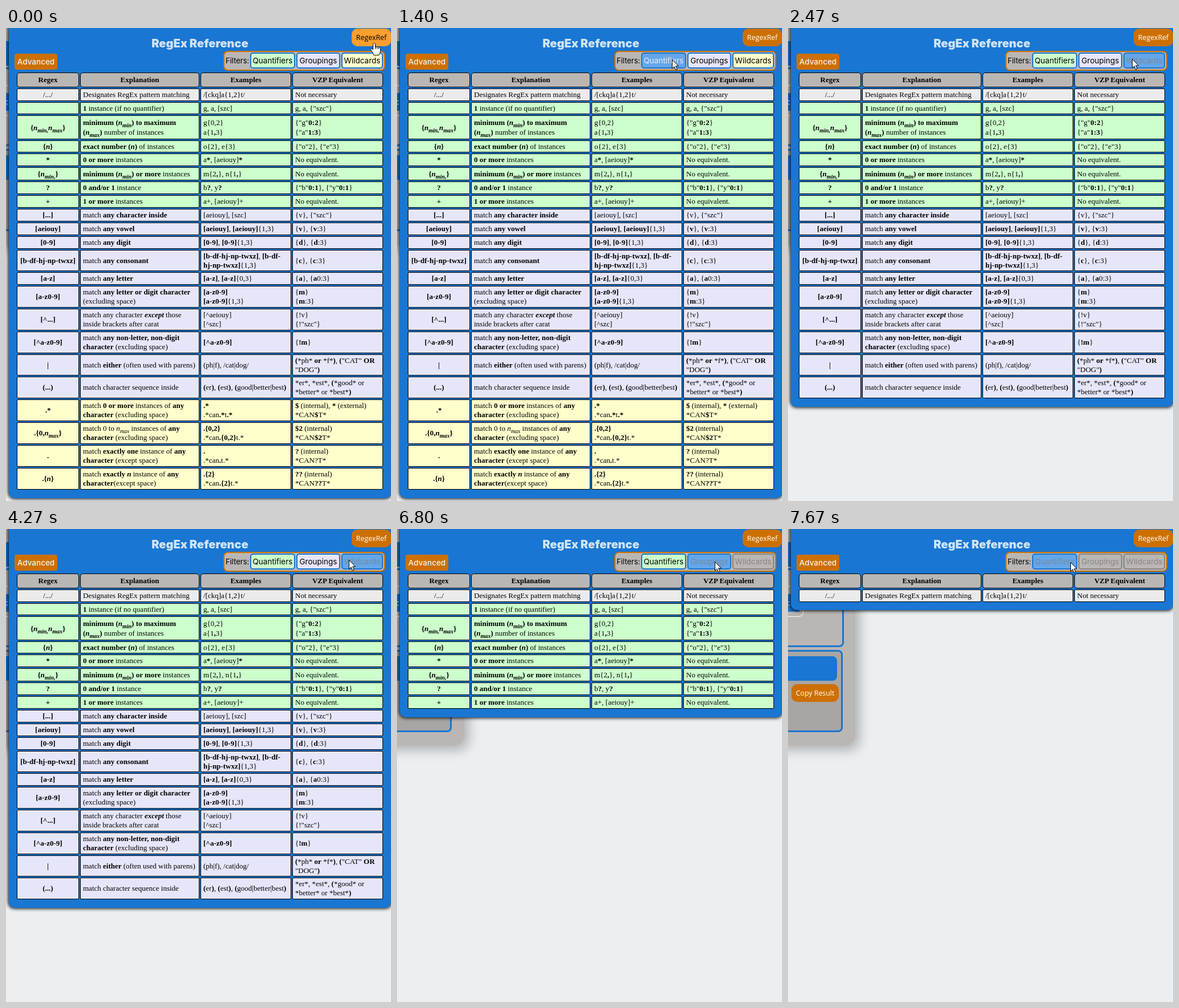
Recreate the animation shown at these times as an HTML page. Size 675 by 829 pixels, loop 8000 ms.

```html
<!DOCTYPE html>
<html lang="en">
<head>
<meta charset="utf-8">
<title>RegEx Reference</title>
<style>
:root { --blue: #1976d2; --orange: #cd7000; --grey: #bab6b4; }
html, body { margin: 0; width: 100%; height: 100%; overflow: hidden; background: #ebeff2; }
#stage { position: relative; width: 675px; height: 829px; overflow: hidden; background: #ebeff2; }
#stage div, #stage svg { position: absolute; box-sizing: border-box; }
.ui { font: 13.5px Inter, "Open Sans", sans-serif; }
.btn { display: flex; align-items: center; justify-content: center; white-space: nowrap; }
.sys { font: 12.4px "Open Sans", "Noto Sans", sans-serif; background: var(--orange); color: #fff; border-radius: 10px; }
#page { left: -60px; top: 0; width: 178px; height: 380px; background: var(--grey);
  border-radius: 0 0 20px 0; box-shadow: 8px 8px 20px rgba(0,0,0,.25); }
#panel { left: 5px; top: -20px; width: 670px; background: var(--blue); border-radius: 10px;
  box-shadow: 0 0 6px 1px #000; }
#title { left: 5px; width: 670px; top: 12px; height: 30px; line-height: 30px; text-align: center;
  font: 900 20px/30px Inter, "Open Sans", sans-serif; color: #cfe4f8; }
.cell { border: 1px solid #000; border-radius: 2px; padding: 0 4px; display: flex; align-items: center;
  font: 13px/16px "Liberation Serif", "Times New Roman", serif; color: #000; white-space: nowrap; }
.mid { justify-content: center; text-align: center; }
.head { background: var(--grey); border-radius: 5px; font-weight: bold; }
.intro { background: #ebebeb; }
.q { background: #cfc; }
.g { background: #e6e6fa; }
.w { background: #ffc; }
sub { font-size: 10px; line-height: 0; }
.filter { top: 43px; height: 28px; border: 2px solid var(--blue); border-radius: 5px; color: #000; }
.filter.hover { background: #64a6ea; color: #e4effb; }
.filter.off { background: var(--grey); border-color: #898583; color: #898583; }
.filter.off.hover { background: #64a6ea; border-color: var(--blue); color: #7b8896; }
#ref.hover { background: #ff9f2f; color: #000; }
</style>
</head>
<body>
<div id="stage">
  <div id="page">
    <div style="left:0;top:23px;width:70px;height:43px;background:var(--blue)"></div>
    <div style="left:0;top:69px;width:158px;height:138px;border:3px solid var(--blue);border-radius:8px"></div>
    <div style="left:0;top:100px;width:87px;height:54px;border:1px solid #fff;border-radius:8px"></div>
    <div class="sys" style="left:0;top:114px;width:80px;height:31px;background:var(--blue);border-radius:0;line-height:31px;padding-left:58px">c</div>
    <div style="left:0;top:212px;width:156px;height:144px;border:3px solid var(--blue);border-radius:8px;background:#a9a5a3"></div>
    <div style="left:0;top:223px;width:146px;height:43px;border-radius:8px;background:var(--blue)"></div>
    <div class="btn sys" style="left:66px;top:272px;width:83px;height:31px">Copy Result</div>
  </div>
  <div id="panel"></div>
  <div id="title">RegEx Reference</div>
  <div class="ui btn" style="left:15px;top:45px;width:75px;height:28px;border-radius:4px;background:var(--orange);color:#f3f5f8;font-weight:500">Advanced</div>
  <div class="ui" style="left:381px;top:40px;width:284px;height:35px;border:2px solid var(--orange);border-radius:8px;background:var(--grey);line-height:31px;padding-left:2px;font-size:13px">Filters:</div>
  <div id="table"></div>
  <div id="ref" class="btn sys" style="left:606px;top:1px;width:69px;height:31px">RegexRef</div>
  <svg id="arrow" width="16" height="22" viewBox="-1 -1 16 22" fill="#fff" stroke="#000">
    <path d="M.5.5V16l3.6-3.3 2.5 6 2.6-1.1-2.5-5.8h4.8z"/>
  </svg>
  <svg id="hand" width="20" height="24" viewBox="-1 -1 20 24" fill="#fff" stroke="#000">
    <path d="M5.5.5c-1 0-2 .8-2 2V12L2 10.5c-1-1-2.5-.5-2.5 1 0 1 1 2 2 3.5C3 17.5 4 18 4.5 21.5H14c.5-3 2.5-4 2.5-7V9c0-2-2.5-2-2.8-.5-.3-2-2.8-2-3-.5-.3-1.8-2.9-1.6-3.2 0V2.5c0-1.2-1-2-2-2z"/>
    <path d="M7.5 8v3M10.7 8v3M13.7 8.5V11" fill="none"/>
  </svg>
</div>
<script>
const $ = id => document.getElementById(id);
const stage = $("stage"), table = $("table"), panel = $("panel");
const LOOP = 8000;
const cols = [[19, 109], [130, 209], [341, 159], [502, 159]];
const nMin = "<i>n<sub>min</sub></i>", nMax = "<i>n<sub>max</sub></i>";
const none = "No equivalent.", noSpace = "<br>(excluding space)";

// group, top, then the four cells
const rows = [
  ["head", 78, "Regex", "Explanation", "Examples", "VZP Equivalent"],
  ["intro", 106, "/.../", "Designates RegEx pattern matching", "/[ckq]a{1,2}t/", "Not necessary"],
  ["q", 130, "", "<b>1</b> instance (if no quantifier)", "g, a, [szc]", 'g, a, {"szc"}'],
  ["q", 153, "{<i>n<sub>min,</sub>n<sub>max</sub></i>}", `<b>minimum (${nMin}) to maximum<br>(${nMax})</b> number of instances`,
    "g{0,2}<br>a{1<b>,</b>3}", '{"g"<b>0:2</b>}<br>{"a"<b>1:3</b>}'],
  ["q", 197, "{<i>n</i>}", "<b>exact number (<i>n</i>)</b> of instances", "o{2}, e{3}", '{"o"2}, {"e"3}'],
  ["q", 220, "*", "<b>0 or more</b> instances", "a<b>*</b>, [aeiouy]<b>*</b>", none],
  ["q", 244, "{<i>n<sub>min,</sub></i>}", `<b>minimum (${nMin}) or more</b> instances`, "m{2<b>,</b>}, n{1<b>,</b>}", none],
  ["q", 269, "?", "<b>0 and/or 1</b> instance", "b<b>?</b>, y<b>?</b>", '{"b"<b>0:1</b>}, {"y"<b>0:1</b>}'],
  ["q", 293, "+", "<b>1 or more</b> instances", "a+, [aeiouy]+", none],
  ["g", 317, "[...]", "match <b>any character inside</b>", "[aeiouy], [szc]", '{v}, {"szc"}'],
  ["g", 341, "[aeiouy]", "match <b>any vowel</b>", "<b>[aeiouy]</b>, <b>[aeiouy]</b>{1,3}", "{<b>v</b>}, {<b>v</b>:3}"],
  ["g", 365, "[0-9]", "match <b>any digit</b>", "<b>[0-9]</b>, <b>[0-9]</b>{1,3}", "{<b>d</b>}, {<b>d</b>:3}"],
  ["g", 389, "[b-df-hj-np-twxz]", "match <b>any consonant</b>",
    "<b>[b-df-hj-np-twxz]</b>, <b>[b-df-<br>hj-np-twxz]</b>{1,3}", "{<b>c</b>}, {<b>c</b>:3}"],
  ["g", 428, "[a-z]", "match <b>any letter</b>", "<b>[a-z]</b>, <b>[a-z]</b>{0,3}", "{<b>a</b>}, {<b>a</b>0:3}"],
  ["g", 452, "[a-z0-9]", "match <b>any letter or digit character</b>" + noSpace,
    "<b>[a-z0-9]<br>[a-z0-9]</b>{1,3}", "{<b>m</b>}<br>{<b>m</b>:3}"],
  ["g", 492, "[^...]", "match any character <b><i>except</i></b> those<br>inside brackets after carat",
    "[^aeiouy]<br>[^szc]", '{!v}<br>{!"szc"}'],
  ["g", 532, "[^a-z0-9]", "match <b>any non-letter, non-digit<br>character</b> (excluding space)",
    "<b>[^a-z0-9]</b>", "{<b>!m</b>}"],
  ["g", 572, "|", "match <b>either</b> (often used with parens)", "(ph|f), /cat|dog/",
    '<b>(</b>*ph* <b>or</b> *f*<b>)</b>, <b>(</b>"CAT" <b>OR</b><br>"DOG"<b>)</b>'],
  ["g", 611, "(...)", "match character sequence inside",
    "<b>(</b>er<b>)</b>, <b>(</b>est<b>)</b>, <b>(</b>good|better|best<b>)</b>",
    "*er*, *est*, <b>(</b>*good* or<br>*better* or *best*<b>)</b>"],
  ["w", 651, ".*", "match <b>0 or more</b> instances of <b>any<br>character</b> (excluding space)",
    "<b>.*</b><br>.*can<b>.*</b>t<b>.*</b>", "<b>$</b> (internal), <b>*</b> (external)<br>*CAN<b>$</b>T*"],
  ["w", 691, `.{0,${nMax}}`, `match 0 to ${nMax} instances of <b>any<br>character</b> (excluding space)`,
    "<b>.{0,2}</b><br>.*can<b>.{0,2}</b>t.*", "<b>$2</b> (internal)<br>*CAN<b>$2</b>T*"],
  ["w", 731, ".", "match <b>exactly one</b> instance of <b>any<br>character</b> (except space)",
    "<b>.</b><br>.*can<b>.</b>t.*", "<b>?</b> (internal)<br>*CAN?T*"],
  ["w", 771, ".{<i>n</i>}", "match <b>exactly <i>n</i></b> instance of <b>any<br>character</b>(except space)",
    "<b>.{2}</b><br>.*can<b>.{2}</b>t.*", "<b>??</b> (internal)<br>*CAN<b>??</b>T*"],
];

function add(parent, cls, box, html) {
  const el = document.createElement("div");
  el.className = cls;
  for (const k in box) el.style[k] = box[k] + "px";
  el.innerHTML = html;
  parent.append(el);
  return el;
}

const groups = {};
rows.forEach(([group, top, ...cells], i) => {
  const next = i + 1 < rows.length ? rows[i + 1][1] : 811;
  const height = next - top - 2;
  const box = groups[group] ||= add(table, "", { left: 0, top: 0 }, "");
  cells.forEach((html, c) => {
    const [left, width] = cols[c];
    const mid = group === "head" || c === 0 ? " mid" : "";
    const text = c === 0 && group !== "intro" ? `<b>${html}</b>` : html;
    const cell = add(box, `cell ${group}${mid}`, { left, top, width, height }, `<span>${text}</span>`);
    if (height > 40) cell.style.lineHeight = "17px";
  });
});

const filters = [
  ["q", "Quantifiers", 428, 79, 7670],
  ["g", "Groupings", 509, 77, 5000],
  ["w", "Wildcards", 588, 73, 2470],
].map(([group, label, left, width, offAt]) => {
  const el = add(stage, `ui btn filter ${group}`, { left, width }, label);
  stage.insertBefore(el, $("ref"));
  return { el, group, left, width, offAt };
});

const smooth = u => u * u * (3 - 2 * u);
const easeOut = u => 1 - Math.pow(1 - u, 1.65);
// start, end, steps, goal x, goal y, easing
const moves = [
  [70, 870, 13, 467, 55, smooth],
  [930, 930, 1, 463, 55, smooth],
  [1400, 2130, 12, 603, 54, easeOut],
  [4270, 4730, 7, 561, 57, smooth],
  [6800, 7200, 7, 495, 58, smooth],
];

function pointer(t) {
  let x = 645, y = 26;
  for (const [start, end, n, gx, gy, ease] of moves) {
    if (t < start) break;
    const k = t >= end ? n : Math.floor((t - start) / (end - start) * (n - 1)) + 1;
    const u = ease(k / n);
    x += (gx - x) * u;
    y += (gy - y) * u;
  }
  return [Math.round(x), Math.round(y)];
}

function place(el, x, y, shown) {
  el.style.left = x + "px";
  el.style.top = y + "px";
  el.style.display = shown ? "block" : "none";
}

function draw(t) {
  const [x, y] = pointer(t);
  const onRef = x >= 606 && y < 32;
  $("ref").classList.toggle("hover", onRef);
  for (const f of filters) {
    const off = t >= f.offAt;
    f.el.classList.toggle("off", off);
    f.el.classList.toggle("hover", !onRef && x >= f.left && x < f.left + f.width && y >= 43 && y < 71);
    groups[f.group].style.display = off ? "none" : "block";
  }
  const bottom = t < 2470 ? 824 : t < 5000 ? 664 : t < 7670 ? 330 : 142;
  panel.style.height = bottom + 20 + "px";
  place($("arrow"), x - 1, y - 1, !onRef);
  place($("hand"), x - 6, y - 1, onRef);
}

const begin = performance.now();
function tick() {
  draw((performance.now() - begin) % LOOP);
  requestAnimationFrame(tick);
}
tick();
</script>
</body>
</html>
```
